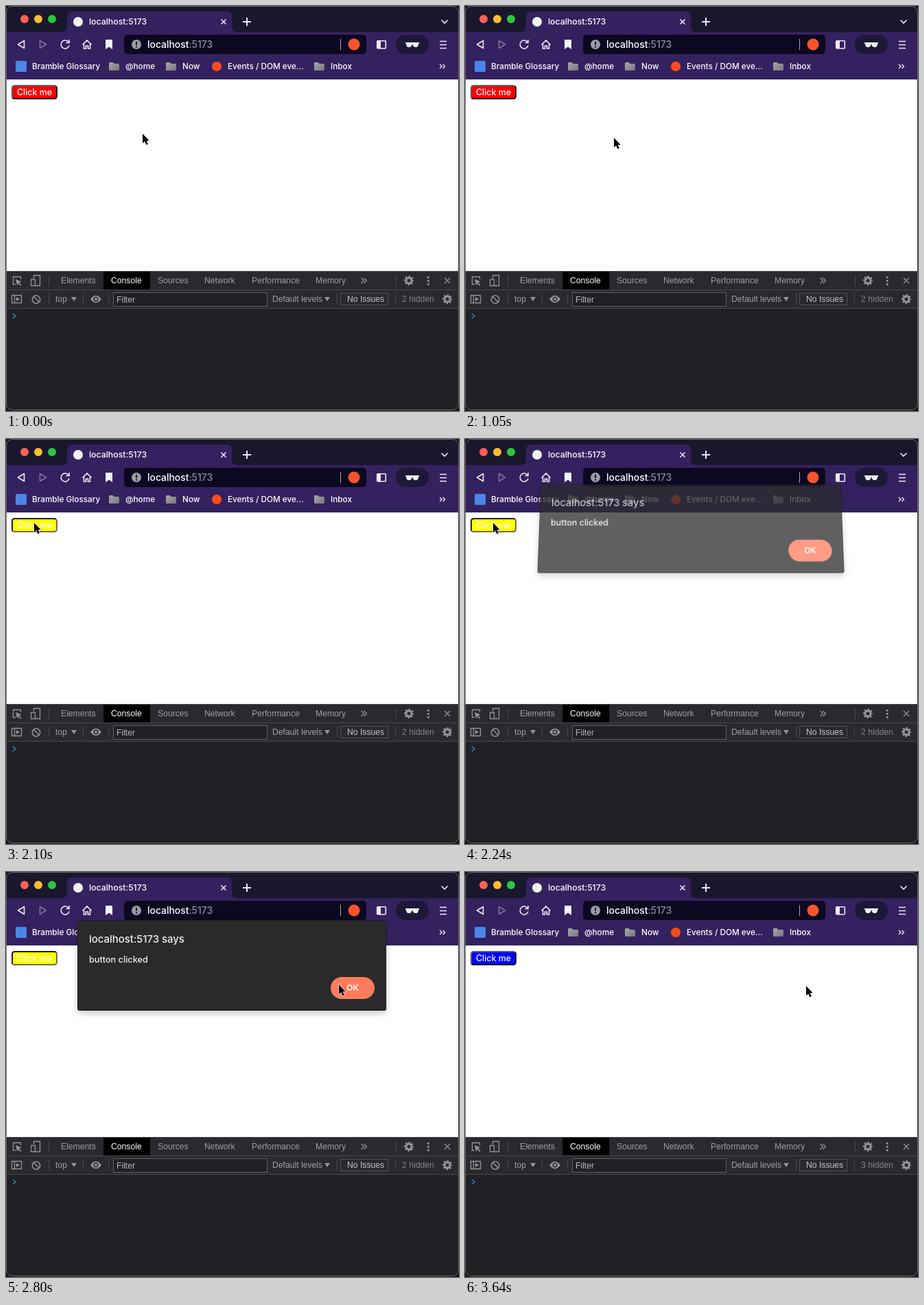
An HTML page that plays this animation: 660x590 px, repeating every 3710 ms.

```html
<!DOCTYPE html>
<html lang="en">
<head>
<meta charset="utf-8">
<title>Button events</title>
<style>
html, body { margin: 0; width: 100%; height: 100%; overflow: hidden; background: #17171a; }
#stage { position: relative; width: 660px; height: 590px; overflow: hidden; }
svg { position: absolute; left: 0; top: 0; display: block; overflow: visible; }
text { white-space: pre; }
.ui { font-family: Inter, Roboto, sans-serif; font-weight: 500; fill: #fff; }
.dev { font: 12.2px "Liberation Sans", Arial, sans-serif; fill: #9aa0a6; }
.line { fill: none; stroke: #eeeaf8; stroke-width: 1.6; }
.tool { fill: none; stroke: #919599; stroke-width: 1.3; }
#dialog { left: 104px; top: 70px; }
#panel { filter: drop-shadow(0 4px 5px rgba(0, 0, 0, .22)); }
</style>
</head>
<body>
<div id="stage">
<svg width="660" height="590" viewBox="0 0 660 590">
  <defs>
    <clipPath id="window"><rect width="660" height="589" rx="9"/></clipPath>
    <linearGradient id="grey" x2="1" y2="1"><stop stop-color="#a7a7a9"/><stop offset="1" stop-color="#77777b"/></linearGradient>
    <g id="folder"><path d="M0 1.5Q0 0 1.500 0H5.500L7.500 2H13.500Q15 2 15 3.500V10.500Q15 12 13.500 12H1.500Q0 12 0 10.500Z" fill="url(#grey)"/></g>
    <g id="gear" fill="none" stroke="#919599">
      <circle r="4" stroke-width="3"/>
      <circle r="6" stroke-width="2.4" stroke-dasharray="2.356" stroke-dashoffset="1.178"/>
    </g>
  </defs>
  <g clip-path="url(#window)">
    <rect width="660" height="590" fill="#19172c"/>
    <!-- tabs -->
    <path d="M81 38Q89 38 89 30V16Q89 8 97 8H321Q329 8 329 16V30Q329 38 337 38Z" fill="#34215f"/>
    <circle cx="27" cy="19" r="6" fill="#ff5f57"/>
    <circle cx="47" cy="19" r="6" fill="#febc2e"/>
    <circle cx="67" cy="19" r="6" fill="#28c840"/>
    <circle cx="105" cy="23" r="7" fill="#f4f4f6"/>
    <text class="ui" x="121" y="27.300" font-size="12.3">localhost:5173</text>
    <path class="line" d="M313.500 19.500l7 7m0-7l-7 7M634.500 20.500l4.500 4.500 4.500-4.500"/>
    <path class="line" d="M351 17v12M345 23h12" style="stroke-width:2"/>
    <!-- toolbar -->
    <rect y="38" width="660" height="69" fill="#34215f"/>
    <path class="line" d="M26.500 50.500V61.500L17.500 56Z" stroke-linejoin="round"/>
    <path class="line" d="M49.500 50.500V61.500L58.500 56Z" stroke-linejoin="round" opacity=".4"/>
    <path class="line" d="M91 52.500A6 6 0 1 0 92 57.500M92 49v4.500h-4.500"/>
    <path class="line" d="M111.500 56.500L118 50l6.500 6.500M113.500 55.500V62H116.500V58H119.500V62H122.500V55.500"/>
    <path d="M145 50Q145 49 146 49H154Q155 49 155 50V63L150 59.500 145 63Z" fill="#f4f2fa"/>
    <rect x="172" y="42" width="353" height="28" rx="5" fill="#0c0820"/>
    <circle cx="190" cy="56" r="7" fill="#9c9aa6"/>
    <path d="M190 52v4.800M190 58.500v2" stroke="#0c0820" stroke-width="2"/>
    <text class="ui" x="206" y="61" font-size="13.9">localhost<tspan fill="#8f8b9d">:5173</tspan></text>
    <path d="M487.500 48v16" stroke="#a9a6b8"/>
    <circle cx="507" cy="56" r="8.500" fill="#f9532d"/>
    <rect class="line" x="540.700" y="50.700" width="12.600" height="11" rx="1"/>
    <path d="M541 51h5v10.500h-5z" fill="#eeeaf8"/>
    <rect x="568" y="42" width="48" height="28" rx="14" fill="#1d1738"/>
    <path d="M582 53h20v2h-1q0 5-4 5-4 0-4.500-4h-1q-.5 4-4.500 4-4 0-4-5h-1z" fill="#f4f2fa"/>
    <path class="line" d="M632 51.500h10M632 56.500h10M632 61.500h10"/>
    <!-- bookmarks -->
    <rect x="14" y="80" width="16" height="16" rx="2" fill="#4a86e8"/>
    <use href="#folder" x="150" y="82"/>
    <use href="#folder" x="233" y="82"/>
    <use href="#folder" x="449" y="82"/>
    <circle cx="307" cy="88" r="7" fill="#ff4a1c"/>
    <g class="ui" font-size="11.75">
      <text x="38" y="92">Bramble Glossary</text>
      <text x="174" y="92">@home</text>
      <text x="257" y="92">Now</text>
      <text x="323" y="92">Events / DOM eve...</text>
      <text x="473" y="92">Inbox</text>
    </g>
    <path class="line" d="M632 85l3 3-3 3M636.500 85l3 3-3 3" style="stroke-width:1.400"/>
    <!-- page -->
    <rect y="107" width="660" height="279" fill="#fff"/>
    <rect id="button" x="9" y="116" width="65" height="19" rx="4" stroke-width="2"/>
    <path id="bevelA" d="M9.500 134Q9 133 9 131V120Q9 116 13 116H70Q72 116 73 117" fill="none" stroke-width="2"/>
    <path id="bevelB" d="M73 117Q74 118 74 120V131Q74 135 70 135H13Q10.500 135 9.500 134" fill="none" stroke-width="2"/>
    <text class="ui" x="16" y="130" font-size="12.4">Click me</text>
    <!-- developer tools -->
    <rect y="386" width="660" height="55" fill="#292a2d"/>
    <rect y="441" width="660" height="149" fill="#202124"/>
    <rect x="142" y="387" width="68" height="26" fill="#000"/>
    <path d="M0 386.500H660M0 413.500H660M0 440.500H660M62.500 392v16M568.500 392v16M62.500 419v15M112.500 419v15M149.500 419v15M482.500 419v15M567.500 419v15" stroke="#48494d"/>
    <g class="dev">
      <text x="80" y="404">Elements</text>
      <text x="153" y="404" fill="#fff">Console</text>
      <text x="221" y="404">Sources</text>
      <text x="289" y="404">Network</text>
      <text x="358" y="404">Performance</text>
      <text x="451" y="404">Memory</text>
      <text x="72" y="431">top</text>
      <text x="388" y="431">Default levels</text>
      <text id="hidden" x="577" y="431" fill="#808489"></text>
    </g>
    <path class="tool" d="M14 405.500H10.500V394.500H21.500V398M517.500 396l4 4-4 4M521.500 396l4 4-4 4M639 396l8 8m0-8l-8 8"/>
    <path d="M14 398l8.500 3.500-3.500 1.500 3.500 3.500-1.200 1.200-3.500-3.500-1.500 3z" fill="#919599"/>
    <path class="tool" d="M40.500 397V392.500H49.500V407.500H43M36.500 398.500h6v9h-6z"/>
    <use href="#gear" x="587" y="400"/>
    <use href="#gear" x="643" y="427"/>
    <path d="M613.800 394h2.800v2.800h-2.800zm0 5h2.800v2.800h-2.800zm0 5h2.800v2.800h-2.800z" fill="#919599"/>
    <path class="tool" d="M8.500 421.500h14v11h-14zM12.500 421.500v11"/>
    <path d="M15 424v6l5-3zM95 424h8l-4 6zM464 424h8l-4 6z" fill="#919599"/>
    <path class="tool" d="M40 423l8.500 8.500" style="stroke-width:1.600"/>
    <circle class="tool" cx="44" cy="427.500" r="5.700" style="stroke-width:1.600"/>
    <path d="M123 427Q131 416.500 139 427 131 437.500 123 427Z" fill="#919599"/>
    <circle cx="131" cy="427" r="2.800" fill="#919599" stroke="#292a2d" stroke-width="1.400"/>
    <rect x="156.500" y="417.500" width="224" height="20" fill="#202124" stroke="#5d6064"/>
    <rect x="487.500" y="418.500" width="69" height="17" fill="none" stroke="#505256"/>
    <g class="dev">
      <text x="161" y="432" fill="#b4b7bb">Filter</text>
      <text x="497" y="431" fill="#c0c3c7">No Issues</text>
    </g>
    <path d="M10 448l4 3.500-4 3.500" fill="none" stroke="#3f78d8" stroke-width="1.500"/>
  </g>
  <rect x=".5" y=".5" width="659" height="588" rx="9" fill="none" stroke="#68686c"/>
  <path d="M659.500 107V386" stroke="#27272b"/>
</svg>

<svg id="dialog" width="450" height="132" viewBox="0 0 450 132">
  <g id="panel">
    <rect x=".5" y=".5" width="449" height="131" rx="2" fill="#2a2a2b" stroke="#1b1b1c"/>
  </g>
  <path id="seam" d="M1 126.500H449" stroke="#202020"/>
  <g class="ui" style="fill:#f0f0f1">
    <text x="17" y="33" font-size="14.9">localhost:5173 says</text>
    <text x="17" y="62" font-size="12.7">button clicked</text>
  </g>
  <rect id="ok" x="369" y="83" width="64" height="32" rx="16"/>
  <text class="ui" x="401" y="103.300" font-size="11.8" text-anchor="middle" style="font-weight:600">OK</text>
</svg>

<svg width="660" height="590" viewBox="0 0 660 590">
  <path id="cursor" d="M0 0V14L3.200 11.200 5.300 16.200 7.800 15.200 5.700 10.300H9.800Z" fill="#000" stroke="#fff" stroke-width="1.200" paint-order="stroke"/>
</svg>
</div>
<script>
const LOOP = 3710, STEP = 70;
const $ = id => document.getElementById(id);
const ease = u => u * u * (3 - 2 * u);

// [time, x, y] stops of the pointer
const route = [
  [0, 199, 186], [140, 199, 186], [910, 217, 192], [1120, 217, 192],
  [1610, 46, 125], [1820, 46, 125], [2030, 41, 122], [2380, 41, 122],
  [2800, 485, 164], [3220, 497, 166], [LOOP, 497, 166]
];
// [time, presence] stops of the dialog
const fade = [
  [0, 0], [2100, 0], [2170, .35], [2240, .75], [2310, .94], [2380, 1],
  [3430, 1], [3500, .95], [3570, .45], [3640, 0], [LOOP, 0]
];

function along(stops, t, curve) {
  const i = stops.findIndex(s => s[0] > t);
  const a = stops[i - 1], b = stops[i];
  const u = curve((t - a[0]) / (b[0] - a[0]));
  return a.slice(1).map((v, k) => v + (b[k + 1] - v) * u);
}

function paintButton(color, pressed) {
  $("button").setAttribute("fill", color);
  $("bevelA").setAttribute("stroke", pressed ? "#1c1c1c" : "#5c5c5c");
  $("bevelB").setAttribute("stroke", pressed ? "#6c6c5c" : "#151515");
}

function draw(t) {
  const [x, y] = along(route, t, ease);
  const [p] = along(fade, t, u => u);
  const pressed = t >= 2100 && t < 3640;
  const over = x < 75 && y < 136;
  const color = pressed ? "#ff0" : over || t >= 3640 ? "#00f" : "#f00";
  const q = 1 - p;

  $("cursor").setAttribute("transform", `translate(${x.toFixed(2)} ${y.toFixed(2)})`);
  paintButton(color, pressed);
  $("hidden").textContent = (t >= 3640 ? 3 : 2) + " hidden";

  const box = $("dialog").style;
  box.visibility = p > 0 ? "visible" : "hidden";
  box.opacity = p;
  box.transform = q > 0
    ? `translateY(${-24 * q}px) scale(${1 - .07 * q * q / .25}) perspective(500px) rotateX(${20 * q}deg)`
      .replace(/scale\([^)]*\)/, `scale(${1 - .28 * q * q})`)
    : "none";
  $("seam").setAttribute("opacity", Math.min(1, 3 * q));
  $("ok").setAttribute("fill", t >= 3430 ? "#ff9a80" : "#ff7b5c");
}

function tick(now) {
  draw(Math.floor(now % LOOP / STEP) * STEP);
  requestAnimationFrame(tick);
}
draw(0);
requestAnimationFrame(tick);
</script>
</body>
</html>
```
